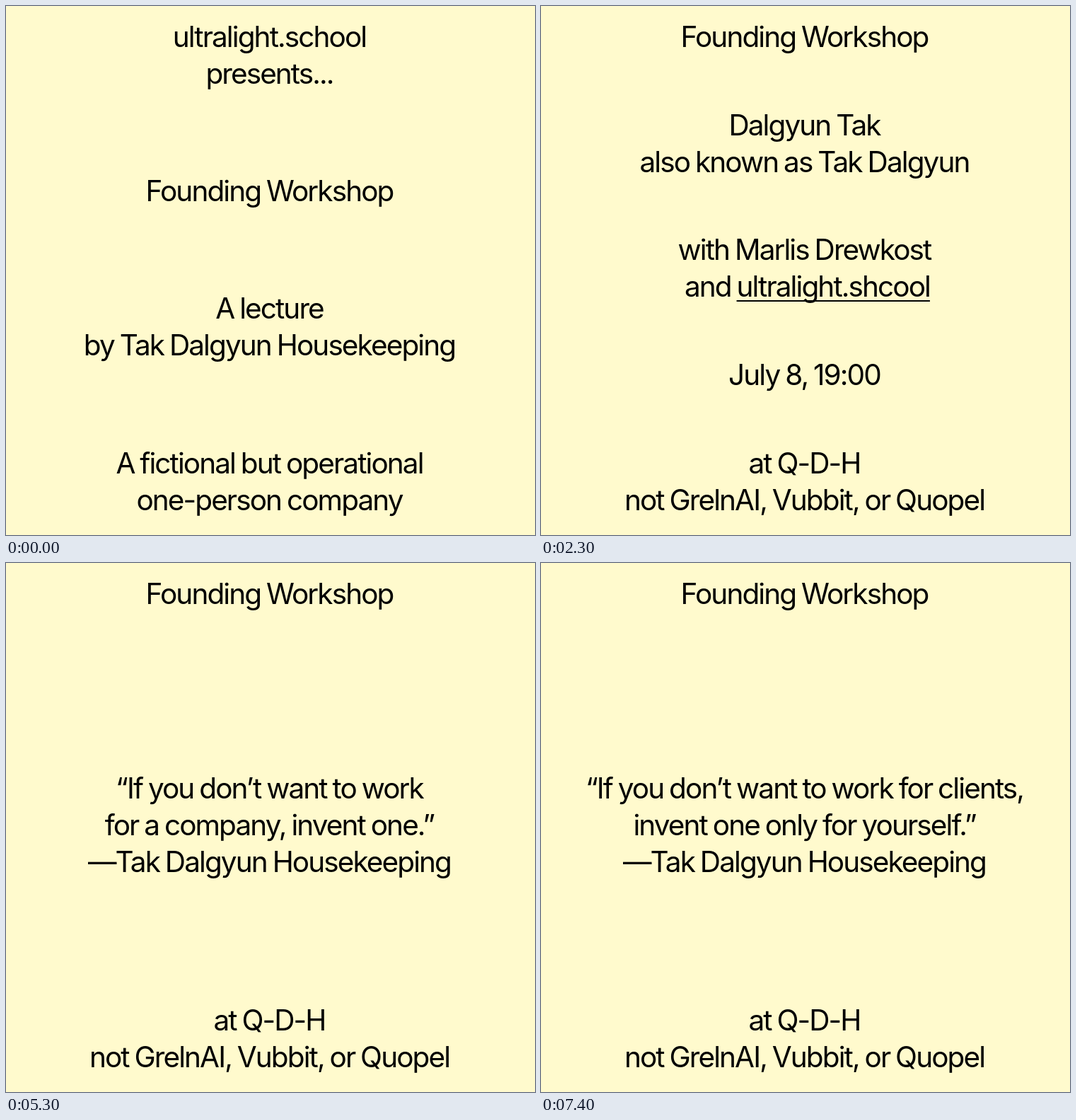
Animation of 748 by 748 pixels, one loop 8000 ms. Source, as an HTML page:

```html
<!DOCTYPE html>
<html lang="en">
<head>
<meta charset="utf-8">
<title>Lecture announcement</title>
<style>
  html, body {
    margin: 0;
    width: 100%;
    height: 100%;
    overflow: hidden;
    background: lemonchiffon;
  }
  .scene {
    position: absolute;
    inset: 0 auto auto 0;
    box-sizing: border-box;
    width: 748px;
    height: 748px;
    padding: 18px 3px 23.5px 0;
    display: flex;
    flex-direction: column;
    justify-content: space-between;
    color: #000;
    font: 400 40.5px/51.95px Inter, "Liberation Sans", sans-serif;
    font-optical-sizing: none;
    letter-spacing: -0.047em;
    word-spacing: -0.04em;
    text-align: center;
    white-space: pre;
    visibility: hidden;
  }
  .scene.on { visibility: visible; }
  .line { height: 51.95px; }
  u {
    text-decoration-thickness: 2px;
    text-underline-offset: 5px;
    text-decoration-skip-ink: none;
  }
</style>
</head>
<body>
<script>
const TITLE = "Founding Workshop";
const MAKER = "Tak Dalgyun Housekeeping";
const VENUE = ["at Q-D-H", "not GrelnAI, Vubbit, or Quopel"];

// The blank line under the title balances the two-line venue, centring the quote.
const quote = (...lines) => [[TITLE, ""], [...lines, "—" + MAKER], VENUE];

const scenes = [
  { ms: 500, groups: [
    ["ultralight.school", "presents..."],
    [TITLE],
    ["A lecture", "by " + MAKER],
    ["A fictional but operational", "one-person company"],
  ] },
  { ms: 3000, groups: [
    [TITLE],
    ["Dalgyun Tak", "also known as Tak Dalgyun"],
    ["with Marlis Drewkost", "\u00a0and <u>ultralight.shcool</u>"],
    ["July 8, 19:00"],
    VENUE,
  ] },
  { ms: 3000, groups: quote("“If you don’t want to work", "for a company, invent one.”") },
  { ms: 1500, groups: quote("“If you don’t want to work for clients,", "invent one only for yourself.”") },
];

const loop = scenes.reduce((sum, s) => sum + s.ms, 0);

for (const s of scenes) {
  s.el = document.createElement("div");
  s.el.className = "scene";
  s.el.innerHTML = s.groups.map(group =>
    "<div>" + group.map(text => `<div class="line">${text}</div>`).join("") + "</div>"
  ).join("");
  document.body.append(s.el);
}

function draw() {
  let t = performance.now() % loop;
  for (const s of scenes) {
    s.el.classList.toggle("on", t >= 0 && t < s.ms);
    t -= s.ms;
  }
  requestAnimationFrame(draw);
}
draw();
</script>
</body>
</html>
```
